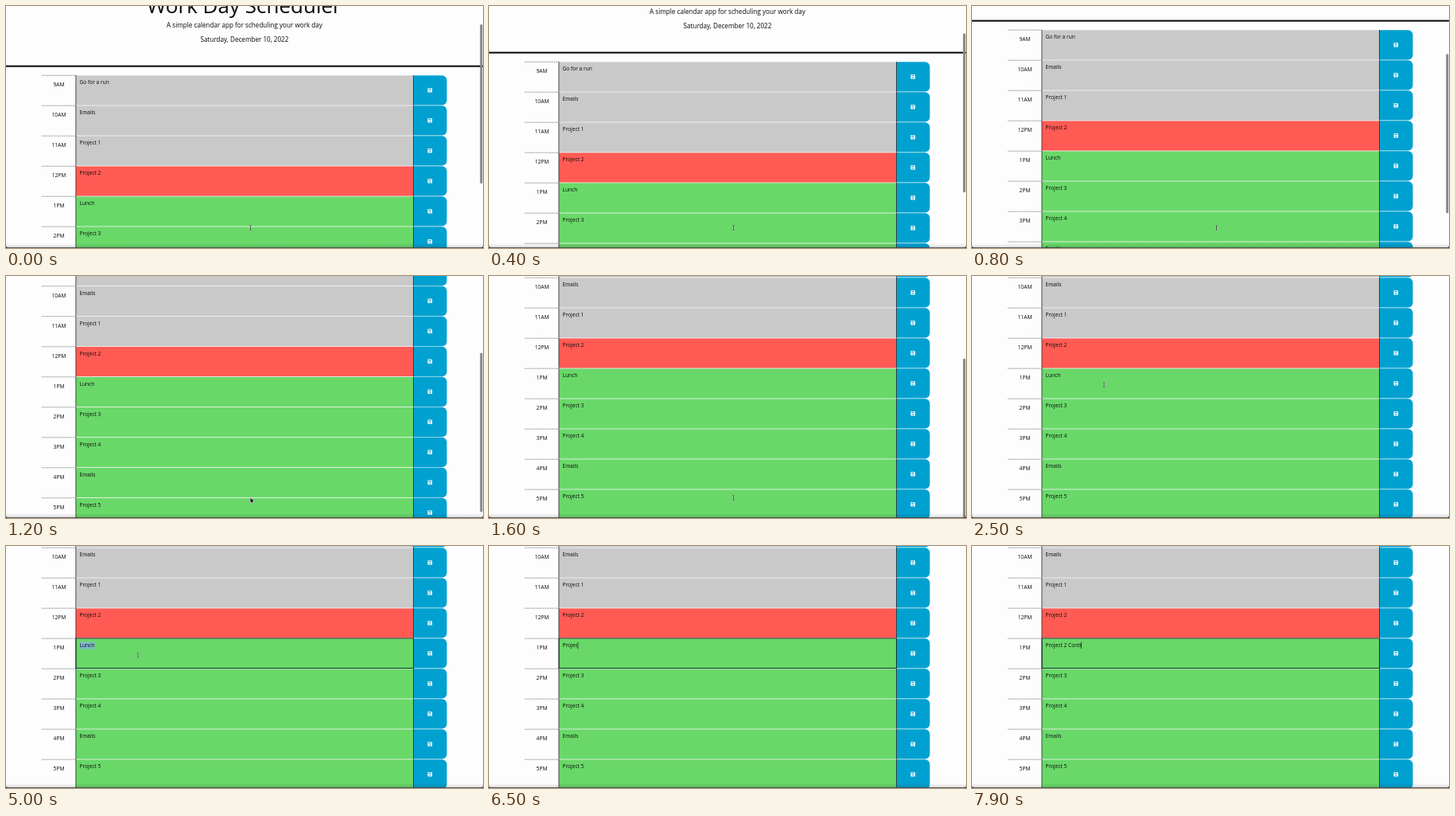
An HTML page with a canvas that plays this animation: 600 px wide and 304 px high, repeating every 8000 ms.

```html
<!DOCTYPE html>
<html lang="en">
<head>
<meta charset="utf-8">
<title>Work Day Scheduler</title>
<style>
  html, body { margin: 0; width: 100%; height: 100%; overflow: hidden; background: #fdfdfd; }
  canvas { display: block; width: 600px; height: 304px; }
</style>
</head>
<body>
<canvas id="stage" width="600" height="304"></canvas>
<script>
const ctx = document.getElementById('stage').getContext('2d');
const LOOP = 8000, STEP = 100, ROW = 38, FIRST_ROW = 87;
const LEFT = 45, FIELD = 88, BUTTON = 512.5, RIGHT = 554.5;
const PAST = '#c9c9c9', PRESENT = '#ff5b54', FUTURE = '#69d869', BLUE = '#00a1d0';
const FONT = '"Open Sans", "Noto Sans", sans-serif';

const rows = [
  ['9AM', 'Go for a run', PAST],
  ['10AM', 'Emails', PAST],
  ['11AM', 'Project 1', PAST],
  ['12PM', 'Project 2', PRESENT],
  ['1PM', 'Lunch', FUTURE],
  ['2PM', 'Project 3', FUTURE],
  ['3PM', 'Project 4', FUTURE],
  ['4PM', 'Emails', FUTURE],
  ['5PM', 'Project 5', FUTURE]
];
const EDITED = 4;
const FOCUS_AT = 3000, SELECT_AT = 3100;
const typed = 'Project 2 Conti';
const keyTimes = [5500, 5800, 6000, 6300, 6400, 6500, 6700, 6800,
                  7000, 7100, 7400, 7600, 7700, 7800, 7900];

// Tracks: [time, value, ...]
const scrollTrack = [[0, 0], [100, 2], [200, 2], [300, 7], [800, 57], [1000, 73], [1100, 98],
                     [1200, 112.4], [1400, 119.5], [1600, 123], [1900, 124.5], [2000, 124.5], [2500, 123]];
const pointerTrack = [[0, 307.5, 278.5], [1700, 307.5, 278.5], [1900, 290, 248],
                      [2100, 240, 204], [2300, 184, 151], [2500, 166, 137]];

function sample(track, t) {
  const i = track.findIndex(k => k[0] > t);
  if (i < 0) return track[track.length - 1].slice(1);
  const a = track[i - 1], b = track[i], p = (t - a[0]) / (b[0] - a[0]);
  return a.slice(1).map((v, n) => v + (b[n + 1] - v) * p);
}

function rect(x, y, w, h, color) {
  ctx.fillStyle = color;
  ctx.fillRect(x, y, w, h);
}

function text(str, x, y, size, align = 'left') {
  ctx.font = `${size}px ${FONT}`;
  ctx.textAlign = align;
  ctx.fillStyle = '#0a0a0a';
  ctx.fillText(str, x, y);
}

function polygon(points) {
  ctx.beginPath();
  points.forEach(([x, y]) => ctx.lineTo(x, y));
  ctx.closePath();
}

function drawHeader(scroll) {
  text('Work Day Scheduler', 299.5, 9 - scroll, 26, 'center');
  text('A simple calendar app for scheduling your work day', 300, 26.6 - scroll, 8.15, 'center');
  text('Saturday, December 10, 2022', 300, 45.4 - scroll, 8.15, 'center');
  rect(0, 74.6 - scroll, 600, 2, '#050505');
}

function drawSaveIcon(x, y) {
  ctx.fillStyle = '#fff';
  polygon([[x - 2.8, y - 2.8], [x + 1.7, y - 2.8], [x + 2.8, y - 1.7], [x + 2.8, y + 2.8], [x - 2.8, y + 2.8]]);
  ctx.fill();
  rect(x - 1.9, y - 1.9, 3.2, 1.3, BLUE);
  ctx.beginPath();
  ctx.arc(x, y + 1.1, 0.85, 0, Math.PI * 2);
  ctx.fill();
}

function drawRow([label, task, color], y) {
  ctx.strokeStyle = '#555';
  ctx.lineWidth = 0.7;
  ctx.setLineDash([1.4, 0.9]);
  ctx.beginPath();
  ctx.moveTo(LEFT, y + 0.2);
  ctx.lineTo(FIELD, y + 0.2);
  ctx.stroke();
  ctx.setLineDash([]);

  rect(FIELD, y, BUTTON - FIELD, ROW, color);
  rect(FIELD, y - 0.4, BUTTON - FIELD, 0.8, '#f4f4f4');

  ctx.fillStyle = BLUE;
  ctx.beginPath();
  ctx.roundRect(BUTTON, y + 0.2, RIGHT - BUTTON, ROW - 0.6, [0, 6, 6, 0]);
  ctx.fill();
  rect(FIELD - 0.5, y, 0.8, ROW, '#222');
  rect(BUTTON - 0.4, y, 0.8, ROW, '#222');
  drawSaveIcon(533.3, y + 18.7);

  text(label, 66.5, y + 14.4, 6.7, 'center');
  if (task) text(task, 92.5, y + 11.3, 6.6);
}

function drawEditor(t, y) {
  ctx.strokeStyle = '#12382c';
  ctx.lineWidth = 1;
  ctx.strokeRect(FIELD, y, BUTTON - FIELD, ROW - 0.5);

  const count = keyTimes.filter(k => k <= t).length;
  const value = count ? typed.slice(0, count) : rows[EDITED][1];
  ctx.font = `6.6px ${FONT}`;
  const width = ctx.measureText(value).width;
  if (!count && t >= SELECT_AT) rect(92.7, y + 4.6, width, 8.8, '#82b8cf');
  text(value, 92.5, y + 11.3, 6.6);
  if (count) rect(92.5 + width, y + 4.8, 0.7, 8.4, '#111');
}

function drawBeam(x, y) {
  const trace = (color, width) => {
    ctx.strokeStyle = color;
    ctx.lineWidth = width;
    ctx.beginPath();
    ctx.moveTo(x - 1.2, y - 3.2);
    ctx.lineTo(x, y - 2.7);
    ctx.lineTo(x + 1.2, y - 3.2);
    ctx.moveTo(x, y - 2.7);
    ctx.lineTo(x, y + 2.7);
    ctx.moveTo(x - 1.2, y + 3.2);
    ctx.lineTo(x, y + 2.7);
    ctx.lineTo(x + 1.2, y + 3.2);
    ctx.stroke();
  };
  trace('rgba(255,255,255,.5)', 1.6);
  trace('#222', 0.7);
}

function drawArrow(x, y) {
  polygon([[x, y], [x, y + 6.2], [x + 1.4, y + 4.9], [x + 2.4, y + 7],
           [x + 3.3, y + 6.6], [x + 2.4, y + 4.6], [x + 4.3, y + 4.5]]);
  ctx.strokeStyle = '#fff';
  ctx.lineWidth = 1;
  ctx.stroke();
  ctx.fillStyle = '#000';
  ctx.fill();
}

function drawWindowEdge() {
  const shade = ctx.createLinearGradient(0, 298, 0, 304);
  shade.addColorStop(0, 'rgba(0,0,0,0)');
  shade.addColorStop(1, 'rgba(0,0,0,.14)');
  rect(0, 298, 600, 6, shade);
  rect(0, 303.2, 600, 0.8, '#444');
  ctx.fillStyle = '#222';
  for (const [x, dir] of [[0, 1], [600, -1]]) {
    ctx.beginPath();
    ctx.moveTo(x, 300.5);
    ctx.quadraticCurveTo(x, 304, x + 3.5 * dir, 304);
    ctx.lineTo(x, 304);
    ctx.fill();
  }
}

function draw(t) {
  const [scroll] = sample(scrollTrack, t);
  const focused = t >= FOCUS_AT;
  rect(0, 0, 600, 304, '#fdfdfd');
  drawHeader(scroll);
  const rowY = i => FIRST_ROW + i * ROW - scroll;
  rows.forEach(([label, task, color], i) =>
    drawRow([label, focused && i === EDITED ? '' : task, color], rowY(i)));
  if (focused) drawEditor(t, rowY(EDITED));

  if (t < 2000) {
    ctx.fillStyle = '#858585';
    ctx.beginPath();
    ctx.roundRect(596.3, 23 + scroll * 0.655, 3, 200, 1.5);
    ctx.fill();
  }
  drawWindowEdge();

  if (t < keyTimes[0]) {
    const [x, y] = sample(pointerTrack, t);
    if (t >= 1100 && t < 1400) drawArrow(x, y);
    else drawBeam(x, y);
  }
}

const start = performance.now();
function tick() {
  const t = (performance.now() - start) % LOOP;
  draw(Math.floor(t / STEP) * STEP);
  requestAnimationFrame(tick);
}
tick();
</script>
</body>
</html>
```
